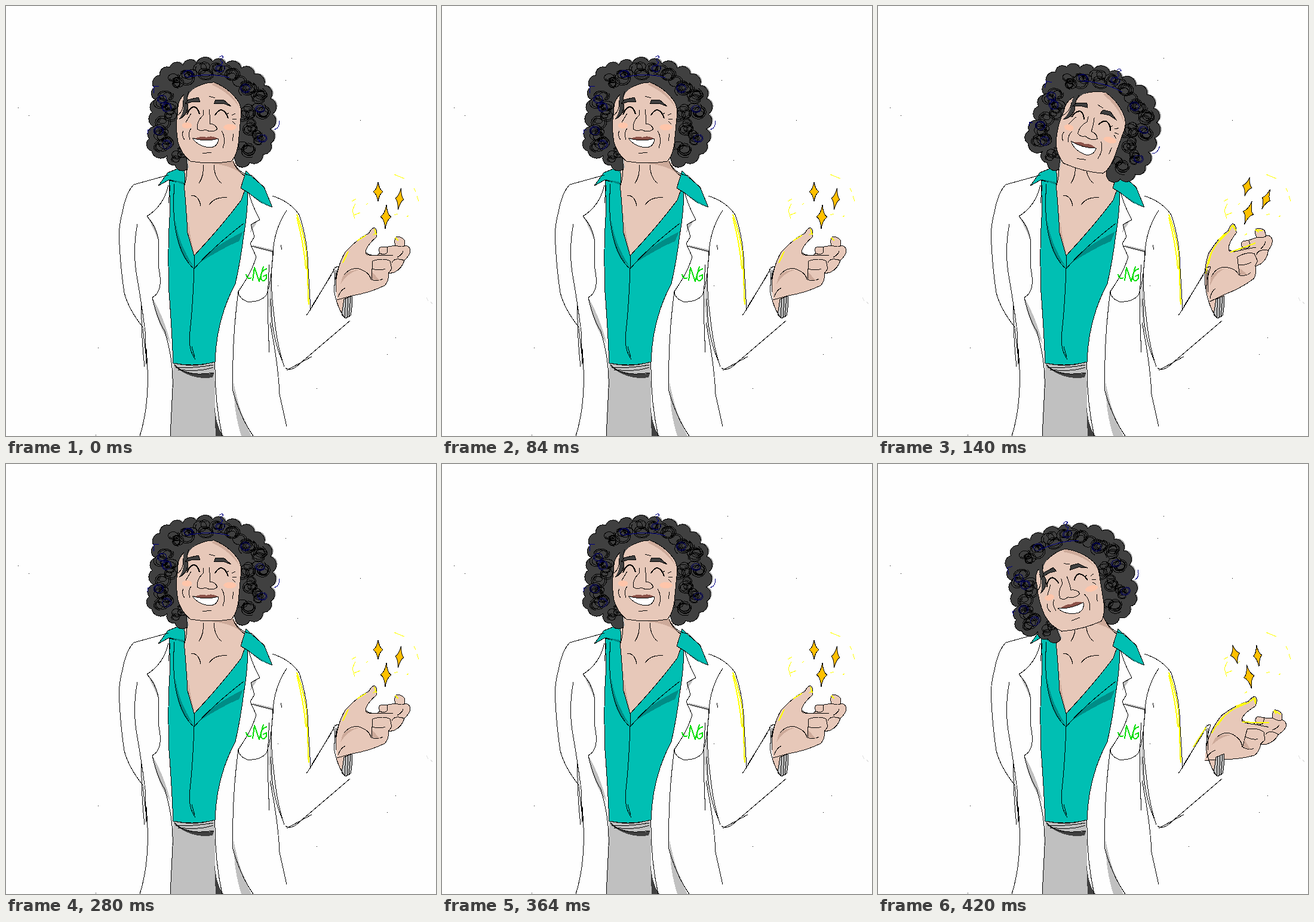
Animation, 720 px wide and 720 px high, one loop 0.56 s. Source, as an HTML page:

```html
<!DOCTYPE html>
<html lang="en">
<head>
<meta charset="utf-8">
<title>Waving sparkles</title>
<style>
html, body { margin: 0; width: 100%; height: 100%; overflow: hidden; background: #fefefe; }
svg { display: block; width: 100vw; height: 100vh; }
.ink { fill: none; stroke: #000; }
.teal { fill: #00bfb3; stroke: #000; }
.deep { fill: #008c86; }
.skin { fill: #e7c8b9; }
.tan { fill: #cdaa9a; }
.grey { fill: #c0c0c0; }
.dark { fill: #404040; }
.glow { fill: none; stroke: #ff0; stroke-width: 2; }
</style>
</head>
<body>
<svg viewBox="0 0 720 720" shape-rendering="crispEdges" stroke-linejoin="round">
  <!-- neck and chest -->
  <path class="skin" d="M304 250 L378 250 Q386 274 402 284 L402 308 L394 325 Q360 370 315 418 L304 380 L297 295 Z"/>
  <path class="tan" d="M345 261 L380 259 L396 283 Q380 267 345 264 Z M304 345 Q306 380 316 416 L306 396 Z"/>
  <path class="ink" d="M303 262 Q304 285 299 300 M380 260 Q385 274 400 285 L402 292
    M330 266 Q332 284 323 297 M348 266 Q349 288 361 297
    M310 317 Q323 317 326 335 M340 333 Q350 319 370 321"/>

  <!-- shirt -->
  <path class="teal" d="M273 292 L298 297 Q302 340 304 380 L315 418 Q360 370 394 325 L401 305
    L405 314 Q404 350 398 384 Q393 425 384 465 Q352 525 350 596 Q316 605 280 598 Q277 530 273 480 Q270 400 275 340 Z"/>
  <path class="deep" d="M284 360 Q289 398 314 436 L300 424 Q284 400 284 360 Z M327 424 Q352 400 397 378 L390 394 Q365 404 327 428 Z"/>
  <path class="ink" d="M282 298 Q278 350 286 385 Q296 425 315 440 L315 418 M315 440 Q345 405 398 364
    M315 440 Q313 500 308 545 Q304 574 317 592 M311 570 L316 588"/>
  <path class="teal" d="M296 269 L271 279 L255 301 L273 291 L299 298 Q302 284 296 269 Z"/>
  <path class="teal" d="M402 276 L412 286 L432 303 L446 337 L427 329 L405 312 L393 305 Z"/>
  <path class="deep" d="M273 290 L298 295 L297 299 Z M404 311 L428 327 L445 336 L430 331 Z"/>

  <!-- belt and trousers -->
  <path class="grey" d="M280 598 Q315 606 349 597 L351 720 L275 720 Z"/>
  <path class="dark" d="M282 600 Q300 620 348 615 L346 622 Q310 627 282 603 Z M349 668 Q352 705 364 720 L351 720 Z"/>
  <path class="grey" d="M287 604 Q320 602 348 600 L347 612 Q312 620 287 604 Z"/>
  <path class="ink" d="M280 598 Q315 606 349 596 M284 606 Q320 606 347 601 M288 609 Q325 613 347 605 M282 600 Q300 622 348 614"/>

  <!-- coat, left half -->
  <path class="grey" d="M236 352 Q253 366 256 395 Q248 374 236 352 Z M245 488 Q264 520 276 566 Q253 535 245 488 Z"/>
  <path class="ink" d="M272 283 L214 299 Q201 312 195 345 Q187 375 190 400 Q192 440 198 480 Q205 508 230 539
    M220 365 Q211 412 220 458 Q228 505 233 545 L235 600 M227 500 Q226 550 232 604 M229 540 L236 598
    M235 575 Q243 660 224 720
    M272 300 Q264 335 236 352 Q251 368 255 390 Q256 410 256 440 Q264 478 245 488
    Q252 522 266 545 Q281 595 279 640 L275 720 M275 300 L272 330"/>

  <!-- coat, right half -->
  <path class="grey" d="M413 400 L447 408 L447 413 L417 405 Z M381 630 Q391 682 411 720 L394 720 Q381 680 381 630 Z M423 358 L411 366 L409 380 Z M443 440 L446 550 L440 500 Z"/>
  <path class="ink" d="M406 312 Q413 336 425 358 L410 366 L416 386 L409 398 L419 420 Q412 445 389 478
    Q378 560 380 645 Q393 690 414 720 M384 465 Q352 525 350 596 Q349 660 362 720
    M411 402 L447 411 Q445 460 436 484 Q425 497 404 495 Q389 489 389 477
    M383 266 Q395 283 412 284 L432 304 M446 318 Q477 328 491 350 Q505 390 506 440 L510 508 L503 518
    M470 342 Q447 378 447 418 Q441 460 449 520 Q454 570 466 604 M441 433 Q436 490 441 580
    M444 490 Q443 550 463 595 M442 530 Q456 600 458 650 L470 704 M460 400 L462 408
    M468 606 Q477 614 494 597 L576 527 M470 610 L512 587
    M510 508 L552 437 M512 503 L545 450"/>
  <path class="glow" stroke-width="3" d="M487 349 Q503 392 504 430 L507 500 M487 354 Q499 400 502 440 M505 440 L506 495"/>
  <path fill="none" stroke="#0d0" stroke-width="2" d="M402 449 Q404 459 411 455 M413 460 L416 438 L424 461 L431 436 M437 440 Q425 443 427 457 Q431 464 436 456 L436 450 L430 453"/>

  <!-- hand -->
  <path class="skin" d="M552 455 L580 455 L580 488 L566 490 L563 516 L554 496 Z"/>
  <g id="hand">
    <path class="skin" stroke="#000" d="M552 470 Q553 438 568 412 Q588 390 607 381 Q613 371 617 371 Q623 374 620 387
      Q603 402 602 412 Q609 419 622 417 L626 414 Q622 406 628 403 L640 403 L652 401 Q649 392 653 387
      Q661 385 667 392 L668 401 Q676 401 677 410 Q676 418 667 426 Q663 440 650 446 L641 448
      Q641 461 634 468 Q610 480 580 485 Q562 490 554 492"/>
    <path class="ink" d="M565 452 Q575 437 591 440 Q609 446 611 458 M602 412 Q601 419 621 417 L648 417
      M626 414 Q634 418 639 412 L638 403 M614 427 Q632 421 643 427 L646 440 L640 448
      M614 427 L613 440 Q626 444 635 440 M613 440 L612 458 Q622 462 631 457 M652 401 Q665 405 668 401
      M646 430 Q650 420 667 426 M655 421 Q665 415 665 410 M556 487 Q560 476 568 472"/>
    <path class="tan" d="M613 445 L613 457 L626 460 Z M560 466 Q572 447 590 442 Q574 442 564 452 Z"/>
    <path class="glow" d="M564 430 L573 411 M588 393 L603 384 M617 373 L620 383 M652 388 L657 393"/>
    <path class="glow" id="glow" d="M557 445 Q566 414 588 396 L608 383 L615 374 L619 381 M604 417 L648 410 M653 388 L664 392"/>
  </g>
  <path class="grey" stroke="#000" d="M566 491 L580 485 Q580 505 577 518 L569 523 L562 517 Z"/>
  <path class="ink" d="M569 490 L567 521 M573 489 L571 522 M577 487 L574 521 M548 440 Q553 452 549 475 Q555 508 568 523 M550 438 L557 436 L551 458 M553 442 L552 480"/>
  <path class="glow" id="cuffGlow" d="M528 474 L549 441"/>

  <!-- head -->
  <g id="head">
    <g id="hair"></g>
    <path class="skin" stroke="#000" d="M288 176 Q286 154 306 143 Q331 127 349 128 Q374 138 389 160 Q396 172 393 188
      L389 230 Q386 252 377 260 Q345 266 309 260 Q293 247 288 228 Q283 200 288 176 Z"/>
    <path class="tan" d="M348 128 Q378 140 392 172 Q376 146 345 132 Z"/>
    <path class="dark" d="M318 136 Q299 147 305 168 Q304 184 290 190 Q299 176 297 160 Q296 145 305 136 Z"/>
    <path class="ink" d="M306 143 Q301 156 305 169 Q303 184 290 189 M288 183 Q298 174 297 158 M298 200 L310 180"/>
    <g fill="#ffc5aa"><ellipse cx="303" cy="200" rx="8" ry="5"/><ellipse cx="375" cy="203" rx="11" ry="5"/></g>
    <path class="dark" stroke="#000" d="M300 164 L305 157 L322 153 L325 160 L313 160 Z M348 164 L351 157 L364 157 L377 168 L363 163 Z"/>
    <path class="ink" stroke-width="2" d="M303 182 Q308 168 316 169 Q322 172 324 181 M350 183 Q355 174 361 174 Q369 177 372 188"/>
    <path class="ink" d="M305 176 L302 174 M370 181 L373 179 M378 183 L384 180 M379 189 L386 190 M379 193 L384 198
      M340 173 Q342 186 341 197 Q352 198 354 207 M330 174 L330 183 Q319 193 320 206 Q327 211 333 207 Q346 213 354 206
      M297 209 Q293 216 299 224 M310 205 Q304 212 308 224 M361 209 Q369 222 363 238 M381 214 L379 226 M329 247 L344 245
      M340 151 L350 154"/>
    <path fill="#8a5148" d="M316 222 Q328 217 336 220 Q344 216 355 222 L336 227 Z"/>
    <path fill="#fff" stroke="#000" d="M312 221 Q333 228 356 222 Q355 235 343 237 Q322 236 312 221 Z"/>
  </g>

  <!-- sparkles -->
  <g fill="none" stroke="#ff0">
    <path d="M650 282 L667 289 M683 305 L686 311 M688 318 L691 327 M579 327 L586 323 M585 331 L580 342 L584 356 M583 350 L593 346 M603 333 L606 330 M650 350 L656 348 M671 353 L674 351 M614 384 L618 381"/>
  </g>
  <g id="sparks" fill="#ffc000" stroke="#000"></g>
  <g id="specks"></g>
</svg>
<script>
const $ = id => document.getElementById(id);

let seed = 7;
const rand = () => (seed = seed * 16807 % 2147483647) / 2147483647;
const spread = r => (rand() * 2 - 1) * r;

// Rounded bumps that join the points of an outline.
function scallop(pts) {
  let d = 'M' + pts[0];
  for (let i = 1; i < pts.length; i++) {
    const [x, y] = pts[i], [px, py] = pts[i - 1];
    const r = Math.hypot(x - px, y - py) * 0.56;
    d += `A${r} ${r} 0 0 1 ${x} ${y}`;
  }
  return d;
}

// A loose curl that winds around a centre.
function curl(cx, cy, r) {
  const start = rand() * 6.28, turn = 7 + rand() * 5, squash = 0.65 + rand() * 0.3;
  let d = '';
  for (let i = 0; i <= 24; i++) {
    const a = start + turn * i / 24, k = r * (1 - 0.35 * i / 24);
    d += `${i ? 'L' : 'M'}${(cx + k * Math.cos(a)).toFixed(1)} ${(cy + k * squash * Math.sin(a)).toFixed(1)}`;
  }
  return d;
}

function drawHair() {
  const edge = [[304, 272], [283, 266], [270, 250], [244, 243], [240, 222], [248, 202], [245, 178],
    [251, 157], [248, 137], [258, 116], [274, 103], [296, 99], [319, 95], [346, 93], [368, 97],
    [394, 104], [416, 114], [432, 133], [443, 155], [446, 181], [442, 206], [443, 230], [430, 248],
    [408, 262], [385, 264]];
  const clumps = [[264, 230], [289, 250], [258, 211], [268, 188], [265, 155], [282, 124], [305, 113],
    [329, 109], [359, 109], [385, 119], [404, 134], [421, 153], [424, 177], [409, 200], [427, 222],
    [403, 241], [270, 172], [401, 178]];
  const shape = scallop(edge) + 'L378 238 L300 238Z';
  let black = '', navy = '';
  clumps.forEach(([x, y], i) => {
    for (let k = 0; k < 4; k++) black += curl(x + spread(8), y + spread(8), 7 + rand() * 8);
    if (i % 2 === 0) navy += curl(x + spread(6), y + spread(6), 9);
  });
  $('hair').innerHTML =
    `<path d="${shape}" fill="#aaa" transform="translate(2 -1)"/>
     <path d="${shape}" class="dark" stroke="#000"/>
     <path d="${black}" class="ink"/>
     <path d="${navy}" fill="none" stroke="#000050"/>
     <path d="M357 86 Q362 81 364 86 Q355 91 363 94 L360 99 M449 207 Q458 205 458 192 M247 146 L247 134 L256 134
       M238 214 L237 207 L242 208 M310 118 Q345 112 374 120" fill="none" stroke="#000080"/>`;
}

function star(x, y, w, h, tilt) {
  return `<path transform="translate(${x} ${y}) rotate(${tilt})"
    d="M0 ${-h} Q2 -4 ${w} 0 Q2 4 0 ${h} Q-2 4 ${-w} 0 Q-2 -4 0 ${-h}Z"/>`;
}

drawHair();
$('sparks').innerHTML = star(-16, -18, 8, 16, 0) + star(20, -6, 7, 18, 8) + star(-3, 24, 9, 20, 3);
$('specks').innerHTML = [[20, 170], [38, 183], [478, 87], [468, 124], [593, 191], [488, 258], [520, 640],
  [638, 583], [652, 555], [154, 572], [150, 718], [455, 468]]
  .map(([x, y]) => `<rect x="${x}" y="${y}" width="1" height="1"/>`).join('') +
  '<path d="M704 488 L707 494 M711 495 L714 499" stroke="#ddd"/>';

const STEP = 140;
const rest = { tilt: 0, nod: [0, 0], hand: [0, 0], spark: [639, 329] };
const right = { tilt: 1, nod: [-1, 12], hand: [-1, 3], spark: [629, 324] };
const left = { tilt: -1, nod: [-1, 11], hand: [-5, 5], spark: [618, 332] };
const poses = [rest, right, rest, left];

const place = (id, value) => $(id).setAttribute('transform', value);
const show = (id, on) => $(id).setAttribute('visibility', on ? 'visible' : 'hidden');

function render(ms) {
  const p = poses[Math.floor(ms / STEP) % poses.length];
  place('head', `translate(${p.nod}) rotate(${p.tilt * 14.5} 345 265)`);
  place('hand', `translate(${p.hand}) rotate(${p.tilt * -10.8} 556 482)`);
  place('sparks', `translate(${p.spark}) rotate(${p.tilt * 15})`);
  show('glow', p.tilt !== 0);
  show('cuffGlow', p.tilt < 0);
}

const begin = performance.now();
function tick() {
  render(performance.now() - begin);
  requestAnimationFrame(tick);
}
render(0);
requestAnimationFrame(tick);
</script>
</body>
</html>
```
